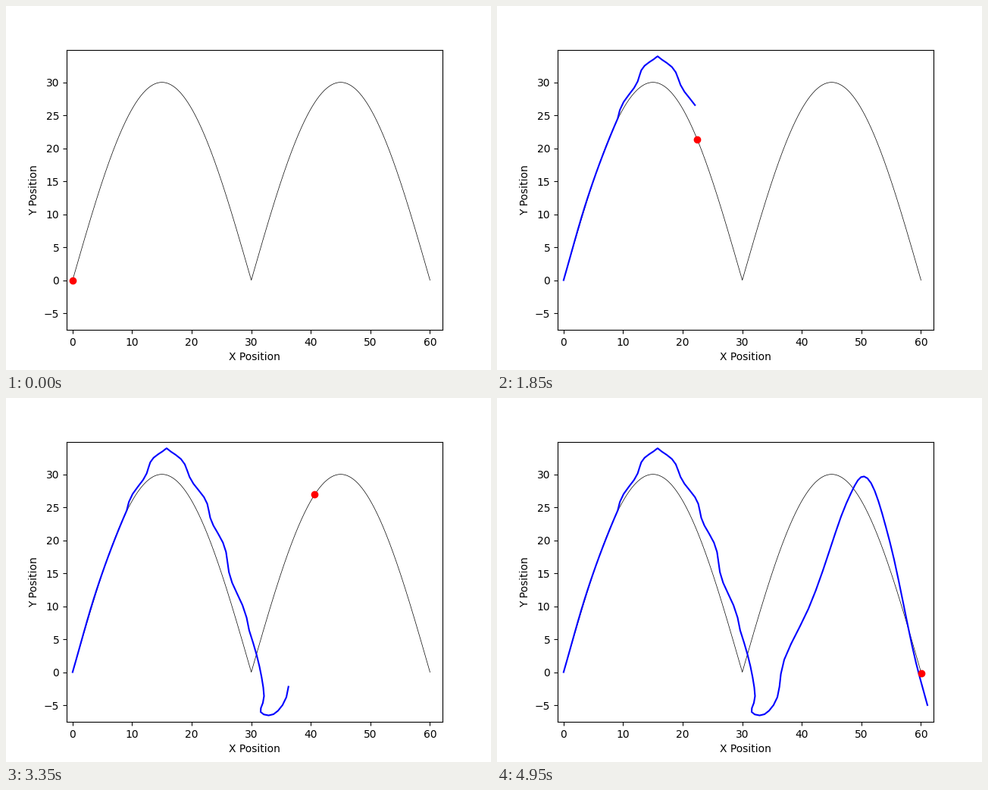
Recreate the animation shown at these times as a matplotlib script. Size 640x480 px, loop 5000 ms.

```python
import numpy as np
import matplotlib.pyplot as plt
from matplotlib.animation import FuncAnimation

FRAMES = 100
INTERVAL = 50
XLIM = (-1, 62.1)
YLIM = (-7.55, 34.95)

# Key points of the trail: step, x, y.
KEYS = np.array([
    (0, 0, 0), (6, 3.64, 11.39), (12, 7.2, 20.41), (18, 10.96, 28.12),
    (24, 14.39, 33.06), (27, 15.79, 33.95), (30, 17.32, 32.95),
    (36, 21.2, 27.54), (42, 24.44, 20.99), (48, 27.62, 11.91),
    (54, 31.37, 0.87), (57, 32.14, -3.62), (60, 31.57, -6.03),
    (63, 33.73, -6.38), (66, 35.89, -3.79), (69, 37.04, 1.9),
    (72, 41.1, 9.61), (78, 47.46, 25.59), (84, 51.02, 29.39),
    (90, 54.78, 19.72), (96, 59.16, 1.44), (99, 61.08, -5),
])


def arc(x):
    """Two sine humps meeting at x = 30."""
    return np.where(x < 30, 30, -30) * np.sin(np.pi * x / 30)


def hermite(t, knots, values):
    """Smooth curve through the values at the given knot times."""
    slopes = np.gradient(values, knots)
    i = np.clip(np.searchsorted(knots, t, side="right") - 1, 0, len(knots) - 2)
    h = knots[i + 1] - knots[i]
    u = (t - knots[i]) / h
    return ((1 + 2 * u) * (1 - u) ** 2 * values[i]
            + u * (1 - u) ** 2 * h * slopes[i]
            + u * u * (3 - 2 * u) * values[i + 1]
            + u * u * (u - 1) * h * slopes[i + 1])


def sway(t):
    """Sideways wobble while the trail goes over the first hump."""
    return np.where((t > 15) & (t < 51), 0.32 * np.sin(np.pi * t / 3), 0)


steps = np.arange(FRAMES)
key_steps, key_x, key_y = KEYS.T
trail_x = hermite(steps, key_steps, key_x) + sway(steps)
trail_y = hermite(steps, key_steps, key_y)

goal_x = np.linspace(0, 60.06, FRAMES)
goal_y = arc(goal_x)

fig, ax = plt.subplots(figsize=(6.4, 4.8), dpi=100)
ax.set(xlim=XLIM, ylim=YLIM, xlabel="X Position", ylabel="Y Position")

curve_x = np.linspace(0, 60, 601)
ax.plot(curve_x, arc(curve_x), color="black", lw=0.5)
trail, = ax.plot([], [], color="blue", lw=1.5)
dot, = ax.plot([], [], "o", color="red", ms=6)


def update(i):
    trail.set_data(trail_x[:i + 1], trail_y[:i + 1])
    dot.set_data([goal_x[i]], [goal_y[i]])
    return trail, dot


anim = FuncAnimation(fig, update, frames=FRAMES, interval=INTERVAL,
                     repeat=True, repeat_delay=0)
plt.show()
```
